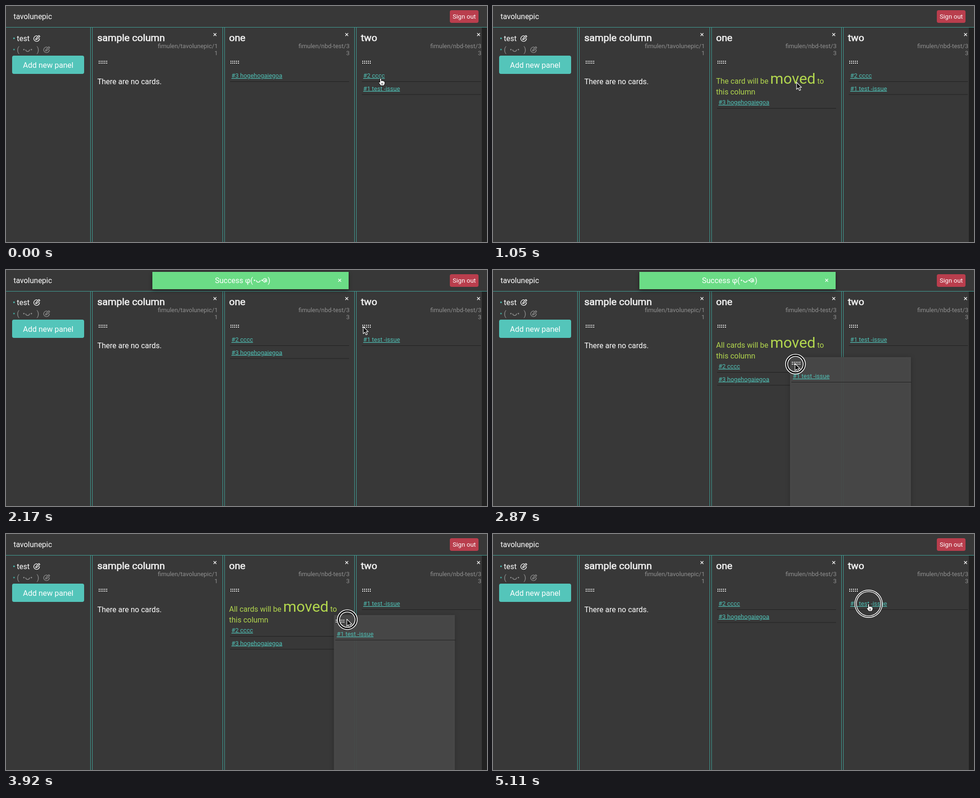
Write an HTML page that moves like this. It is 1022 px wide and 504 px high and loops after 5.18 s.

```html
<!DOCTYPE html>
<html lang="en">
<head>
<meta charset="utf-8">
<title>Kanban drag and drop</title>
<style>
  html, body { margin: 0; height: 100%; overflow: hidden; background: #383838; }
  svg { display: block; width: 1022px; height: 504px; font: 16px Roboto, sans-serif; }
  text { fill: #fff; white-space: pre; }
  .title { font-size: 21px; fill: #f0f0f0; stroke: #f0f0f0; stroke-width: .7px; }
  .path { font-size: 13px; fill: #8f8f8f; text-anchor: end; }
  .link { font-size: 13px; fill: #50c1b6; text-decoration: underline; }
  .note { fill: #b2d64e; }
  .big { font-size: 32px; }
  .line { fill: none; stroke: #40a198; }
  .drag { filter: drop-shadow(0 1px 5px rgba(0, 0, 0, .25)); }
  .toast { filter: drop-shadow(0 3px 4px rgba(0, 0, 0, .4)); }
</style>
</head>
<body>
<svg viewBox="0 0 1022 504"><g id="page"></g><g id="scene"></g></svg>
<script>
const LOOP = 5180;
const CARD_PRESS = 130, CARD_DROP = 900, CARD_NOTE_END = 1100;
const MOVED = 1500, TOAST_END = 3600;
const PANEL_PRESS = 2380, PANEL_DROP = 5030;
const COLUMN_ONE_END = 742, LAG = 70;

// Pointer tip: time, x, y
const track = [
  [0, 796, 154], [200, 796, 154], [850, 645, 163], [1300, 645, 163],
  [2050, 759, 121], [2250, 759, 121], [2380, 764, 121], [2800, 642, 200],
  [3560, 640, 200], [3920, 724, 182], [4300, 781, 130], [4600, 781, 130],
  [4950, 798, 149], [LOOP, 798, 149]
];

const text = (x, y, s, cls = '', extra = '') =>
  `<text x="${x}" y="${y}" class="${cls}" ${extra}>${s}</text>`;
const rect = (x, y, w, h, fill, r = 0) =>
  `<rect x="${x}" y="${y}" width="${w}" height="${h}" rx="${r}" fill="${fill}"/>`;
const path = (d, stroke = '#fff', width = 1.3, fill = 'none') =>
  `<path d="${d}" stroke="${stroke}" stroke-width="${width}" fill="${fill}" stroke-linejoin="round"/>`;
const circle = (x, y, r, fill, stroke = 'none', width = 0) =>
  `<circle cx="${x}" cy="${y}" r="${r}" fill="${fill}" stroke="${stroke}" stroke-width="${width}"/>`;
const at = (x, y, body, attrs = '') => `<g transform="translate(${x} ${y})" ${attrs}>${body}</g>`;

const cross = (x, y) => path(`M${x - 3} ${y - 3}l6 6m0-6l-6 6`);
const grip = (x, y) => [0, 4, 8, 12, 16].map(dx =>
  rect(x + dx, y, 2, 2, '#fff') + rect(x + dx, y + 4, 2, 2, '#fff')).join('');
const face = (x, y, color) => circle(x, y, 1.5, color) + circle(x + 16, y, 1.5, color) +
  path(`M${x + 4} ${y}q0 4 4 4t4-4`, color, 1.5);
const editIcon = (x, y, color) => path(
  `M${x + 2} ${y - 6}A6 6 0 1 0 ${x + 6} ${y - 1}M${x - 2} ${y + 2}l1-3 6-6 2 2-6 6z`, color, 1.4);
const card = (x, y, label, width = 253) =>
  text(x + 5, y, label, 'link') + rect(x + 2, y + 8, width, 1, '#202020');

function column(x, right, title, repo, tail) {
  return text(x, 75, title, 'title') + cross(right - 6, 61) +
    text(right, 90, repo, 'path') + text(right, 105, tail, 'path') + grip(x + 3, 117);
}

function drawPage() {
  const bars = [179.5, 183.5, 460.5, 464.5, 740.5, 744.5].map(x => `M${x} 46V504`).join('');
  return rect(0, 0, 1022, 504, '#383838') + rect(1011, 46, 11, 458, '#222') +
    `<path class="line" d="M0 45.5H1022${bars}"/>` +
    text(16, 28, 'tavolunepic') +
    rect(943, 9, 61, 27, '#b93e4d', 4) + text(949, 27, 'Sign out', '', 'font-size="13.5"') +
    circle(17, 69, 1.7, '#50c1b6') + text(23, 75, 'test') + editIcon(65, 70, '#fff') +
    circle(17, 93, 1.7, '#40a198') + text(23, 99, '(', '', 'style="fill:#8f8f8f"') +
    face(38, 93, '#8f8f8f') + text(65, 99, ')', '', 'style="fill:#8f8f8f"') + editIcon(86, 94, '#8f8f8f') +
    rect(13, 106, 153, 39, '#54c5ba', 4) + text(36, 132, 'Add new panel', '', 'font-size="16.4"') +
    column(194, 450, 'sample column', 'fimulen/tavolunepic/1', 1) +
    column(474, 730, 'one', 'fimulen/nbd-test/3', 3) +
    column(754, 1010, 'two', 'fimulen/nbd-test/3', 3) +
    text(194, 167, 'There are no cards.');
}

// Monotone cubic through the track, so holds stay still
function pointer(t) {
  t = Math.max(0, t);
  let i = track.findIndex(k => k[0] > t) - 1;
  if (i < 0) i = track.length - 2;
  const h = track[i + 1][0] - track[i][0], u = (t - track[i][0]) / h;
  return [1, 2].map(axis => {
    const slope = j => track[j] && track[j + 1] ?
      (track[j + 1][axis] - track[j][axis]) / (track[j + 1][0] - track[j][0]) : 0;
    const tangent = j => {
      const a = slope(j - 1), b = slope(j);
      return a * b > 0 ? 2 * a * b / (a + b) : 0;
    };
    const p = track[i][axis], q = track[i + 1][axis];
    return p + (q - p) * u * u * (3 - 2 * u) +
      h * u * (1 - u) * (tangent(i) * (1 - u) - tangent(i + 1) * u);
  });
}

const note = subject =>
  text(474, 166, `${subject} will be`, 'note') + text(589, 166, 'moved', 'note big') +
  text(689, 166, 'to', 'note') + text(474, 189, 'this column', 'note');

const list = (x, y, labels) => labels.map((label, i) => card(x, y + i * 27.5, label)).join('');

function toast(t) {
  const opacity = Math.min(1, (t - MOVED) / 150, (TOAST_END - t) / 150);
  if (opacity <= 0) return '';
  return `<g opacity="${opacity}"><g class="toast">${rect(311, 4, 417, 37, '#6bdc86')}</g>` +
    text(444, 28, 'Success φ(') + face(528, 22, '#fff') +
    path('M551 24a1.5 1.5 0 1 1 1-2.5q1 4-2.5 4.500a4 4 0 1 1 4.500-3v3') +
    text(556, 28, ')') + cross(709, 22) + '</g>';
}

function ring(t, x, y) {
  const [press, drop] = t < MOVED ? [CARD_PRESS, CARD_DROP] : [PANEL_PRESS, PANEL_DROP];
  if (t < press || t > drop + 140) return '';
  const grow = Math.max(0, t - drop) / 10, r = 21 + grow, band = Math.max(3, 4.5 - grow / 6);
  return circle(x, y, r - band / 2, 'none', '#080808', band) +
    circle(x, y, r, 'none', '#fff', 1.6) + circle(x, y, r - band, 'none', '#fff', 1.6);
}

const arrow = path('M0 0V15L3.500 11.800 6 17.500 8.700 16.300 6.200 10.800H10.800Z', '#fff', 1.1, '#111');
const hand = path('M-1.500 1Q0-1 1.500 1V6Q3 4.500 4.300 6 6 5 7 7 9 6.500 9 9V12L7 16H0L-4 10Q-5 7-1.500 9Z',
  '#111', 1.1, '#fff') + path('M2 10v4m2.500-4v4', '#111', .9);

function drawScene(t) {
  const [x, y] = pointer(t), [lagX, lagY] = pointer(t - LAG);
  const draggingCard = t >= CARD_PRESS && t < CARD_DROP;
  const draggingPanel = t >= PANEL_PRESS && t < PANEL_DROP;
  const overOne = x < COLUMN_ONE_END;
  const cardNote = t >= CARD_PRESS && t < CARD_NOTE_END && overOne;
  const panelNote = draggingPanel && overOne;
  const moved = t >= MOVED;
  let out = cardNote ? note('The card') : panelNote ? note('All cards') : '';

  out += list(474, cardNote || panelNote ? 210 : 153, moved ? ['#2 cccc', '#3 hogehogaiegoa'] : ['#3 hogehogaiegoa']);
  out += list(754, 153, moved ? ['#1 test -issue'] : ['#2 cccc', '#1 test -issue']);

  if (draggingCard && t > 200) {
    out += at(lagX - 42, lagY - 16, rect(0, 0, 255, 25, 'rgba(74,74,74,.9)') + card(0, 15, '#2 cccc'), 'class="drag"');
  }
  if (draggingPanel && t > 2420) {
    out += at(lagX - 11, lagY - 14, rect(0, 0, 257, 504, 'rgba(73,73,73,.94)') +
      grip(4, 10) + card(1, 45, '#1 test -issue', 255), 'class="drag"');
  }
  const onLink = t < 200 || t >= PANEL_DROP;
  return out + toast(t) + ring(t, x + (onLink ? 0 : 1), y + (onLink ? 0 : 1)) + at(x, y, onLink ? hand : arrow);
}

const scene = document.getElementById('scene');
document.getElementById('page').innerHTML = drawPage();
const start = performance.now();
function tick() {
  scene.innerHTML = drawScene((performance.now() - start) % LOOP);
  requestAnimationFrame(tick);
}
tick();
</script>
</body>
</html>
```
